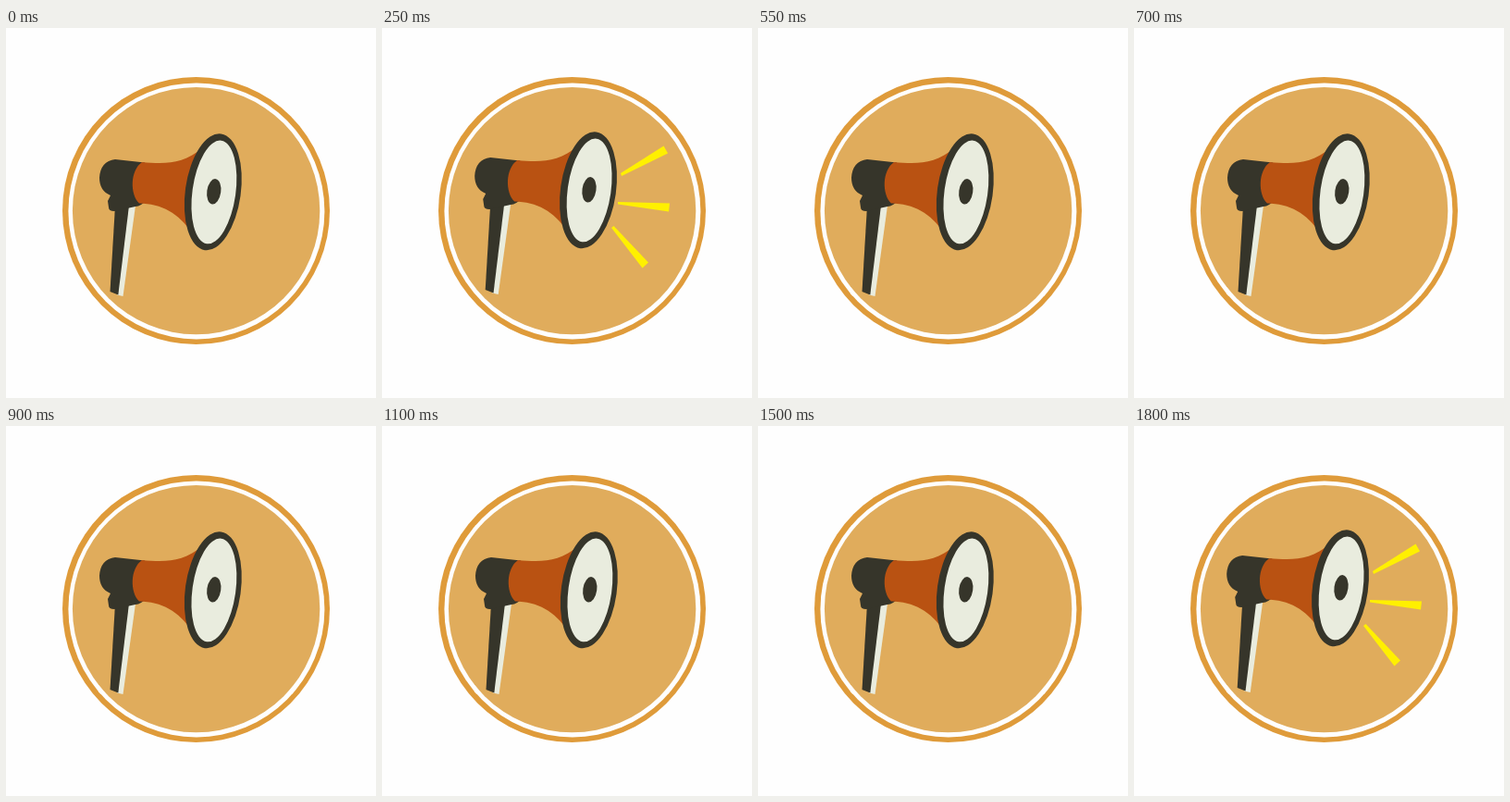
An HTML page that plays this animation: 400x400 px, repeating every 1850 ms.

```html
<!DOCTYPE html>
<html lang="en">
<head>
<meta charset="utf-8">
<title>Megaphone</title>
<style>
  html, body { margin: 0; width: 100%; height: 100%; overflow: hidden; background: #fefefe; }
  svg { display: block; width: 100vw; height: 100vh; }
  .dark { fill: #36352a; }
  .cream { fill: #e9ecde; }
  .orange { fill: #b95212; }
  .rays { fill: #fff000; }
</style>
</head>
<body>
<svg viewBox="0 0 400 400">
  <g>
    <circle cx="205.5" cy="197.5" r="144.5" fill="#df9b3a"/>
    <circle cx="205.9" cy="197.9" r="138.5" fill="#fefefe"/>
    <circle cx="205.6" cy="197.6" r="133.7" fill="#e0ac5c"/>
  </g>
  <g id="horn">
    <path class="cream" d="M129 192L140 192L126.500 290L120 288.500Z"/>
    <path class="dark" d="M118 192L133 192L121.300 288.500L112.500 285Z"/>
    <path class="dark" d="M118 142L150 145.500L149 189L146 191Q143 193 140 193L117 198Q111 198 111 194L110 187L113 181Q101 176 101 162Q102 144 118 142Z"/>
    <path class="orange" d="M147 145C171 147 191 148 213 129L201 222C187 200 168 190 144 189.500C134 180 134 154 147 145Z"/>
    <g transform="translate(224 177.300) rotate(8)">
      <ellipse class="dark" cx="-.2" rx="30" ry="63.500"/>
      <ellipse class="cream" cx=".9" rx="23.400" ry="56.300"/>
      <ellipse class="dark" cx=".7" cy="-.6" rx="7.500" ry="13.800"/>
    </g>
  </g>
  <g id="rays" class="rays" visibility="hidden">
    <path d="M258 157L304.500 127.500L309 135.500L259 160Z"/>
    <path d="M255 188L311 189.500L310 198.500L255 190.500Z"/>
    <path d="M248 216L250.500 214L288 253.500L281.500 259.500Z"/>
  </g>
</svg>
<script>
  const LOOP = 1850;
  // Each entry flips between resting and shouting.
  const flips = [50, 100, 250, 300, 400, 550, 600];
  for (let t = 700; t <= 1800; t += 100) flips.push(t);

  const horn = document.getElementById("horn");
  const rays = document.getElementById("rays");
  const start = performance.now();

  function draw(now) {
    const t = Math.max(0, now - start) % LOOP;
    const shouting = flips.filter(f => f <= t).length % 2 === 1;
    horn.setAttribute("transform", shouting ? "translate(-0.8 -2)" : "");
    rays.setAttribute("visibility", shouting ? "visible" : "hidden");
    requestAnimationFrame(draw);
  }
  draw(start);
</script>
</body>
</html>
```
